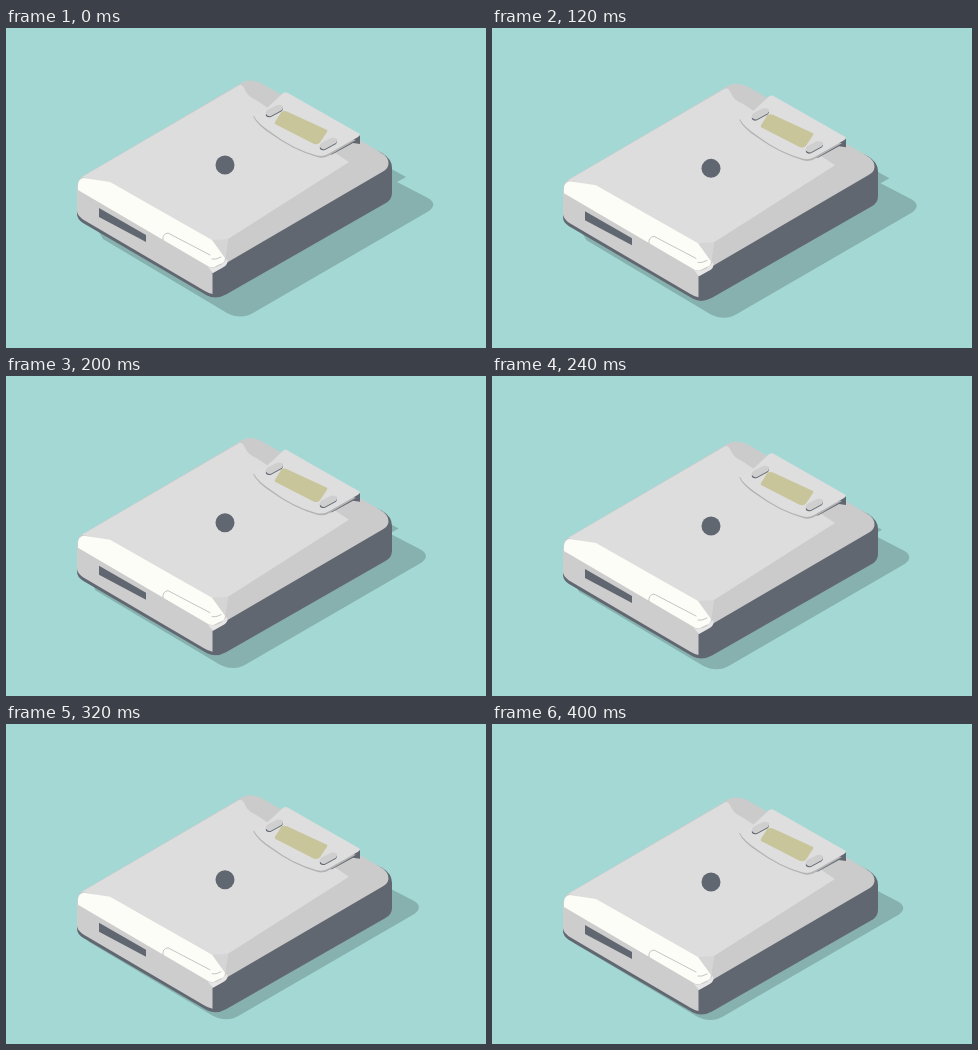
Write an HTML page that moves like this. It is 480 px wide and 320 px high and loops after 0.44 s.

```html
<!DOCTYPE html>
<html lang="en">
<head>
<meta charset="utf-8">
<title>Floating player</title>
<style>
  html, body { margin: 0; width: 100%; height: 100%; overflow: hidden; background: #a3d8d4; }
  svg { display: block; width: 480px; height: 320px; animation: sink 440ms step-end infinite; }
  .shadow { transform: translate(calc(var(--e) * -16px), calc(var(--e) * 7.5px)); }
  .device { transform: translateY(calc(var(--e) * 21px)); }
  .dark { fill: #616770; }
  .line { fill: none; stroke: #c4c4c4; stroke-width: 1; stroke-linecap: round; }
  /* Sine ease, held in 11 equal steps */
  @keyframes sink {
    0% { --e: 0; }
    9.09% { --e: .007; }
    18.18% { --e: .06; }
    27.27% { --e: .16; }
    36.36% { --e: .3; }
    45.45% { --e: .46; }
    54.54% { --e: .62; }
    63.63% { --e: .77; }
    72.72% { --e: .894; }
    81.81% { --e: .973; }
    90.9%, 100% { --e: 1; }
  }
</style>
</head>
<body>
<svg viewBox="0 0 480 320">
  <defs>
    <g id="button">
      <path class="dark" d="M-8 5 Q-9 1-5-1 L3-5 Q9-6 9-2 L8 0 L-3 6 Q-6 7-8 5Z"/>
      <path fill="#cfcfcf" d="M-8 3 Q-9 0-5-2 L3-6 Q9-7 9-3 L8-1 L-3 5 Q-6 6-8 3Z"/>
    </g>
  </defs>

  <path class="shadow" fill="#87b1ae" d="M380 138 L400 149 L391 154 L422 170 Q432 176 423 183 L247 285 Q235 292 221 285 L97 211 L93 204 L200 150Z"/>

  <g class="device">
    <!-- sides -->
    <path class="dark" d="M71 158 L240 60 L376 125 Q386 131 386 140 V165 Q386 172 379 175.500 L220 266.500 Q210 272 201 267.500 L77 195 Q71 191 71 186Z"/>
    <path fill="#cdcdcd" d="M71 156 L207 236 L220 236 L206.500 245 V266 Q202 265 198 262.500 L77 191.500 Q71 187 71 183Z"/>

    <!-- lid -->
    <path fill="#cbcbcb" d="M72 156 Q72 151 77 148 L232 57 Q242 49 255 55 L374 124 Q383 129 382.500 136 Q382 141 377 143.500 L222 234 Q212 243 204 239Z"/>
    <path fill="#dddddd" d="M76 149 L232 58 Q236 55 239 62 Q242 69 250 72 L343 134 L222 211 L219 231 L205 213 L104 155Z"/>
    <path fill="#d5d5d5" d="M205 212 L222 211 L219 231Z"/>
    <path fill="#fdfdf8" d="M72 157 Q72 151 78 150 L104 154 L206 212 L219 230 Q219 235 214 236 L208 239 Q204 240 200 237 L72 162Z"/>
    <path fill="#e6e6e6" d="M221 231 Q223 237 216 240 L207 245 L202 239 Q208 241 215 237Z"/>

    <!-- front details -->
    <path class="line" d="M157 212 Q156 206 162 205 L204 227"/>
    <path class="line" stroke="#a9a9a9" d="M206 231 L210 231 L215 229"/>
    <path class="dark" d="M93 180 L140 207 V214 L93 189Z"/>

    <!-- display panel -->
    <path class="dark" d="M354 107 V116 L347 115 L326 126.500 L320 126Z"/>
    <path fill="#b3b3b3" d="M247 88 Q251 97 265 106 Q287 122 311 129 Q318 131 324 127 L350 112Z"/>
    <path fill="#dedede" d="M276 66 Q279 63 282 65 L353 105.500 Q355 107 352 109 L323 125.500 Q318 129 311 127.500 Q287 121 266 105 Q251 95 248 88 L261 80Z"/>
    <path fill="#c9c59b" d="M281 83.500 Q276 81.500 274 86 L269 94 Q268 96 271 97 L307 115.500 Q312 118 315 113 L321 104 Q322 102 320 101.500Z"/>
    <use href="#button" x="268" y="83"/>
    <use href="#button" x="322" y="116"/>

    <circle class="dark" cx="219" cy="137" r="9.5"/>
  </g>
</svg>
</body>
</html>
```
